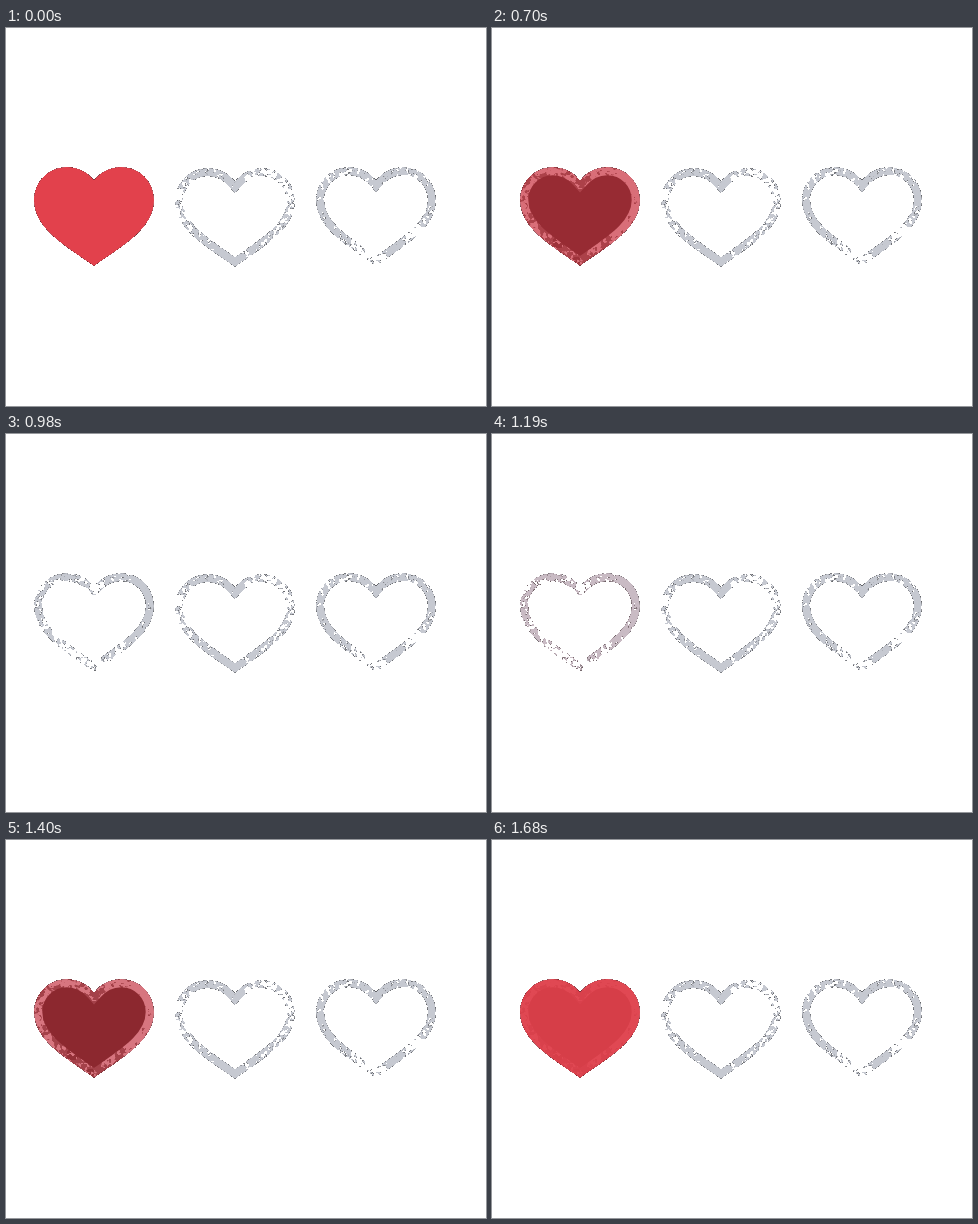
An HTML page with a canvas that plays this animation: 480 by 378 pixels, repeating every 1750 ms.

```html
<!DOCTYPE html>
<html lang="en">
<head>
<meta charset="utf-8">
<title>Hearts</title>
<style>
  html, body { margin: 0; width: 100%; height: 100%; overflow: hidden; background: #fff; }
  canvas { display: block; }
</style>
</head>
<body>
<canvas id="stage" width="480" height="378"></canvas>
<script>
const LOOP = 1750, STEP = 70;
const W = 124, H = 103, PAD = 2, RIM = 8.3;
const RED = [226, 65, 76], GREY = [198, 201, 209];
const HEART = new Path2D('M60 13C67 5 76 0 87 0C106 0 120 15 120 33C120 61 90 78 60 99' +
  'C30 78 0 61 0 33C0 15 14 0 33 0C44 0 53 5 60 13Z');

// Rim solidity, 0-9, in 16 sectors clockwise from the notch.
const HEARTS = [
  { x: 28, y: 139, seed: 3, solid: '2689974423356447', gaps: [[38, 75, 6], [56, 93, 4]] },
  { x: 169, y: 140, seed: 8, solid: '9533455598653387', gaps: [] },
  { x: 310, y: 139, seed: 14, solid: '9568515923568656', gaps: [] }
];

const ctx = document.getElementById('stage').getContext('2d');
const clamp = v => Math.min(1, Math.max(0, v));
const mix = (a, b, t) => a + (b - a) * t;

function hash(x, y, seed) {
  let h = Math.imul(x, 374761393) + Math.imul(y, 668265263) + Math.imul(seed, 974634777);
  h = Math.imul(h ^ (h >>> 13), 1274126177);
  return ((h ^ (h >>> 16)) >>> 0) / 4294967296;
}

function noise(x, y, seed) {
  const i = Math.floor(x), j = Math.floor(y), u = x - i, v = y - j;
  return mix(
    mix(hash(i, j, seed), hash(i + 1, j, seed), u),
    mix(hash(i, j + 1, seed), hash(i + 1, j + 1, seed), u), v);
}

// Coverage of the heart, or of its rim, in 0..1.
function coverage(rimOnly) {
  const c = document.createElement('canvas');
  c.width = W;
  c.height = H;
  const g = c.getContext('2d');
  g.translate(PAD, PAD);
  if (rimOnly) {
    g.clip(HEART);
    g.lineWidth = RIM * 2;
    g.stroke(HEART);
  } else {
    g.fill(HEART);
  }
  const { data } = g.getImageData(0, 0, W, H);
  return Float32Array.from({ length: W * H }, (_, i) => data[i * 4 + 3] / 255);
}

const body = coverage(false), rim = coverage(true);

function solidity(solid, x, y) {
  const turn = Math.atan2(x - 60, 46 - y) / (2 * Math.PI);
  const s = (turn + 1) % 1 * 16, i = Math.floor(s);
  return mix(+solid[i % 16], +solid[(i + 1) % 16], s - i);
}

// Alpha of the worn grey rim.
function wornRim({ seed, solid, gaps }) {
  return rim.map((cover, i) => {
    if (!cover) return 0;
    const x = i % W - PAD, y = Math.floor(i / W) - PAD;
    const n = .6 * noise(x / 3, y / 3, seed) + .4 * noise(x / 1.4, y / 1.4, seed + 50);
    const keep = clamp(.5 + (.2 + .07 * solidity(solid, x, y) - n) * 14);
    const bare = gaps.some(([gx, gy, r]) => Math.hypot(x - gx, y - gy) < r);
    return cover * mix(bare ? .1 : .32, 1, keep);
  });
}

// Red fades over the rim; pixels less than half opaque vanish, the rest sit on black.
function drawHeart(heart, fill) {
  const img = ctx.createImageData(W, H), d = img.data;
  for (let i = 0; i < W * H; i++) {
    const a = body[i] * fill, g = heart.grey[i] * (1 - a), p = i * 4;
    const shown = a + g >= .5;
    for (let c = 0; c < 3; c++) d[p + c] = shown ? RED[c] * a + GREY[c] * g : 255;
    d[p + 3] = 255;
  }
  ctx.putImageData(img, heart.x - PAD, heart.y - PAD);
}

function fillAt(step) {
  if (step < 8) return 1;
  if (step <= 14) return 1 - Math.pow((step - 7) / 7, 1.3);
  if (step < 17) return 0;
  return 1 - Math.exp(-.105 * Math.pow(step - 16, 1.6));
}

let last = -1;
function render(t) {
  const step = Math.floor(t % LOOP / STEP);
  if (step === last) return;
  last = step;
  drawHeart(HEARTS[0], fillAt(step));
}

ctx.fillStyle = '#fff';
ctx.fillRect(0, 0, 480, 378);
for (const heart of HEARTS) {
  heart.grey = wornRim(heart);
  drawHeart(heart, 0);
}

render(0);
const start = performance.now();
(function tick() {
  render(performance.now() - start);
  requestAnimationFrame(tick);
})();
</script>
</body>
</html>
```
